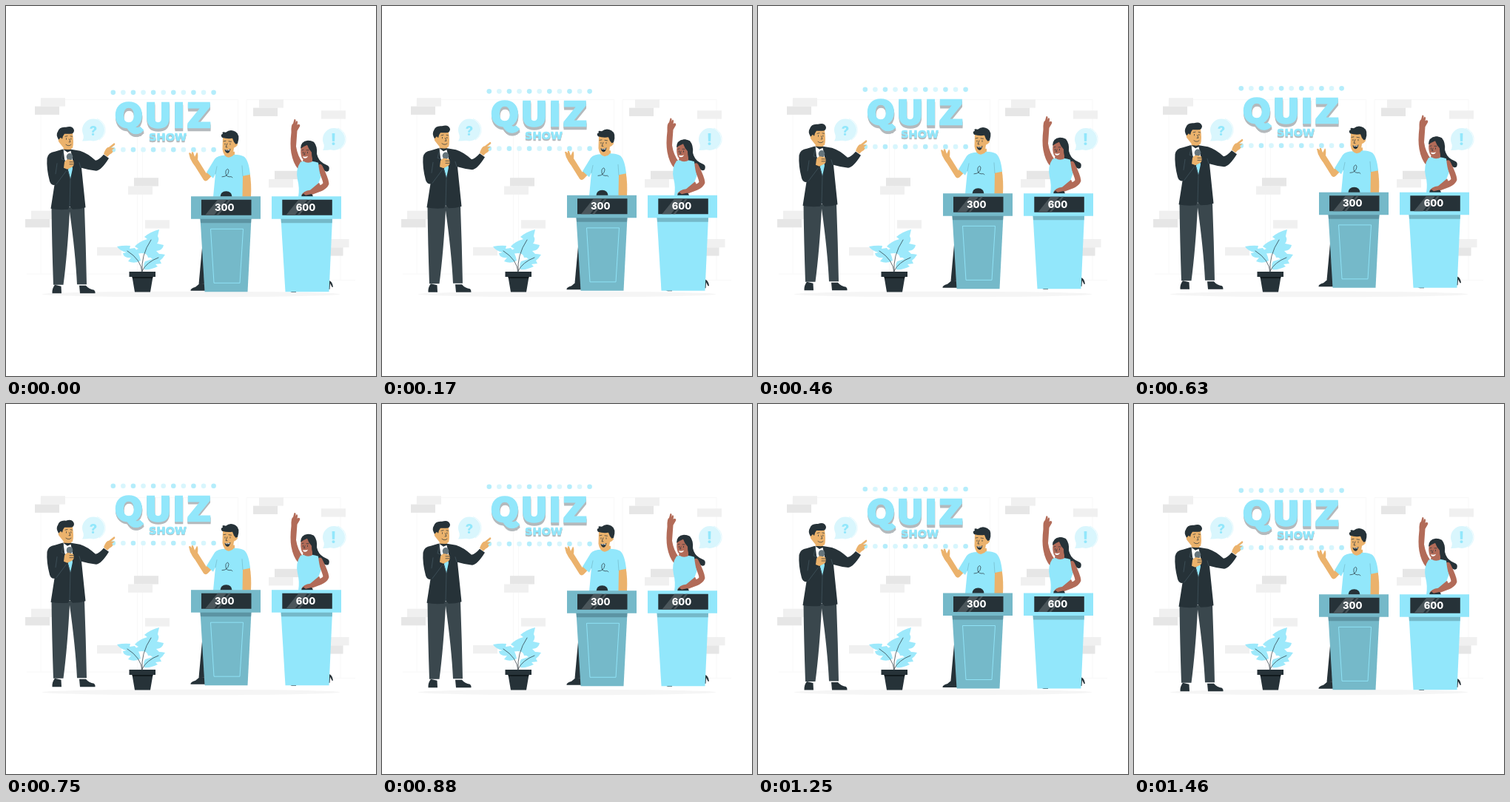
An HTML page that plays this animation: 500x500 px, repeating every 1500 ms.

```html
<!DOCTYPE html>
<html lang="en">
<head>
<meta charset="utf-8">
<title>Quiz show</title>
<style>
  html, body { margin: 0; width: 100%; height: 100%; overflow: hidden; background: #fff; }
  svg { display: block; width: 100%; height: 100%; }
  text { font-family: Inter, sans-serif; font-weight: 800; text-anchor: middle; }
  .cyan { fill: #92e7fb; }
  .teal { fill: #75b9c9; }
  .dark { fill: #263238; }
  .slate { fill: #3a474d; }
  .tan { fill: #ebb26c; }
  .brown { fill: #b26b58; }
  .white { fill: #fff; }
  .line { fill: none; stroke: #263238; stroke-width: .7; stroke-linecap: round; stroke-linejoin: round; }
  .limb { fill: none; stroke-linecap: round; stroke-linejoin: round; }
  .face { fill: none; stroke: #263238; stroke-width: .7; stroke-linecap: round; }
  .quiz, .show { font-family: "DejaVu Sans", sans-serif; font-weight: 700; }
  .quiz { font-size: 45px; stroke-width: 2.4; }
  .show { font-size: 14.5px; stroke-width: .6; }
</style>
</head>
<body>
<svg viewBox="0 0 500 500">
  <defs>
    <g id="quiz">
      <text class="quiz" x="166 205.500 233.500 260.700" y="164">QUIZ</text>
      <path d="M163 163L172 161Q175 167 181 163.500L186 168Q180 174.500 172 172.500Q166 170.500 163 163Z"/>
    </g>
    <text id="show" class="show" x="218.500" y="182">SHOW</text>
    <g id="bubble">
      <circle r="15" fill="#d9f6fd"/>
      <path d="M-14 3Q-12 11-15 15Q-8 15-3 14Z" fill="#d9f6fd"/>
      <path d="M5-15A15.500 15.500 0 0 1 8 13.500" fill="none" stroke="#d9f6fd" stroke-width=".8"/>
    </g>
    <g id="screen">
      <path class="dark" d="M264 262H331.500V283H264Z"/>
      <path d="M269 283L286 262H298L281 283ZM284 283L301 262H304L287 283Z" fill="#4b565b"/>
    </g>
  </defs>

  <path d="M47 362V126.500H313.500V250M325 250V126.500H452V370M177.500 165V360M184.500 190V360M28 362H165M440 370.500H472" fill="none" stroke="#f8f8f8"/>
  <g id="bricks"></g>
  <ellipse cx="250" cy="389.500" rx="201" ry="3.800" fill="#f5f5f5"/>

  <use href="#bubble" x="118" y="167.500"/>
  <text class="cyan" x="118" y="174.500" font-size="18">?</text>
  <use href="#bubble" x="443" y="180"/>
  <text class="cyan" x="442.500" y="187.500" font-size="21">!</text>

  <g id="plant">
    <path d="M207 302Q195 305 187 312L191 315Q180 318 174 325L179 328Q172 331 174 335L184 334Q191 334 192 340Q202 340 207 335L203 331Q212 330 213 323L204 321Q208 316 205 311Z" fill="#9de9fb"/>
    <path d="M150 325Q160 323 168 324L167 328L174 327Q180 333 182 344Q174 349 165 345L169 340Q159 341 158 334L163 333Q154 331 150 325Z" fill="#9de9fb"/>
    <path d="M215 336Q202 333 194 339L198 342L188 345Q185 350 187 356Q195 357 205 352L202 349L210 348L208 344Q212 341 215 336Z" fill="#9de9fb"/>
    <path class="line" d="M184 360Q182 337 196 316M184 360Q183 343 164 331M184 358Q190 346 206 340"/>
    <path class="dark" d="M166.500 359H202V366H198.500L195 386.500H174L170.500 366H166.500Z"/>
    <path d="M170.500 366H198.500L198 368H171Z" fill="#11191d"/>
  </g>

  <g id="floating">
    <g id="dots"></g>
    <g fill="#b4b9bc" stroke="#b4b9bc">
      <use href="#quiz" x=".3" y="3.800"/>
      <use href="#quiz" x=".2" y="1.900"/>
      <use href="#show" y="1.800"/>
    </g>
    <g fill="#92e7fb" stroke="#92e7fb">
      <use href="#quiz"/>
      <use href="#show"/>
    </g>

    <g id="host">
      <path class="dark" d="M66 377L74.500 379L75 388.500H62.500Q62 382 66 377ZM99 378L108 378Q112 383 119 384Q121 386 120.500 388.500H100Z"/>
      <path class="slate" d="M61.500 272H106Q108 325 109 376.500H96Q94 335 86 278Q83 335 77.500 377H64Q62 320 61.500 272Z"/>
      <path class="tan" d="M78 187H88V203H77Z"/>
      <path class="dark" d="M76 194L66 197Q57 198 55.500 206Q54.500 220 59 237Q61 243 65.500 242L60.500 274Q70 276 84 275L86 271L90 275Q100 275 107.500 272.500L102 219Q112 222 122 223Q129 222 139 206L132 201Q126 208 121 209Q110 199 100 196L88 194Z"/>
      <path class="white" d="M77.500 194L83 198L87.500 196L90 207L89 220L87 230L79 207Z"/>
      <path class="cyan" d="M84 203L87 202L90 220L87 234L84 221Z"/>
      <path class="line" d="M67 227L69 213M68 241L83 221M78 195L75 207L79 208L87 234L86 271M101 219L99 212" style="stroke:#455a64"/>
      <path class="tan" d="M132 200Q135 191 139 191L146 185.500Q148 186 147 188L142 192L147 192L143 195Q147 197 140 201L137 204Z"/>
      <path class="tan" d="M72 174Q78 166 90 172Q92 186 90 192Q83 197 77 191L73 186Q69 182 72 179Z"/>
      <path class="dark" d="M71 181Q67 174 70 170Q72 163 81 164Q90 161 92 168Q92 173 87 173H79Q77 175 76 180L74 178Z"/>
      <path class="face" d="M80 176.500L83 175.800M87 176L89.500 176.500M81.500 179V180.500M87.800 179V180.500M85.500 180L87 184H85M81 187.500Q85 190.500 88 187.500"/>
      <path class="limb" d="M85.500 204L82 221" stroke="#263238" stroke-width="4"/>
      <ellipse cx="86" cy="204" rx="4.300" ry="4.800" fill="#66757c"/>
      <path class="tan" d="M79 211Q82 206 87 208L91 209Q93 216 89 218L83 221L78 219Z"/>
      <path class="face" d="M86 211H91M86 214H91"/>
    </g>

    <g id="leftPlayer">
      <path class="dark" d="M266 316H275V376H260.500Z"/>
      <path class="dark" d="M262 375L269 376V385H249.500Q249 382 256 380Z"/>
      <path class="limb" d="M280 222L270 232.500L256.500 211" stroke="#ebb26c" stroke-width="7.800"/>
      <path class="tan" d="M252 212Q248 206 247 199Q249 197 251 201Q250 196 253 198L255 204L258 198Q260 199 259 208L261 213L255 216Z"/>
      <path class="tan" d="M318 227L329.500 226Q332 241 331 258H319Z"/>
      <path class="tan" d="M297 197H309V208H297Z"/>
      <path class="cyan" d="M297 202Q286 202 282 207L271 225L280 233L283 227L280 258H319.500L320 230L330 228Q328 209 322 204Q317 201 308 201Q304 207 297 202Z"/>
      <path class="line" d="M283 227L285 217M320 230L319 216" style="stroke:#75b9c9"/>
      <path class="line" d="M292 231Q300 231 301 223Q300 218 297 223Q296 231 302 231Q305 230 306 232"/>
      <path class="tan" d="M293 177Q302 173 311 178L313 188Q311 191 308 192Q307 204 301 205Q294 204 292.500 194Z"/>
      <path class="dark" d="M292 178Q289 174 293 173Q291 169 297 171Q303 166 310 170Q317 174 313 186L310.500 187L308 184L306 179Q299 180 292 178Z"/>
      <path class="face" d="M294 183L297 182.500M301 183L304.500 183.500M296 186V187.500M303 186V187.500M299 186L297 191H299"/>
      <path class="dark" d="M295.500 194Q300 195.500 303.500 193Q302.500 199 299 199Q296 198 295.500 194Z"/>
      <path class="white" d="M296.500 194.300Q300 195.500 302.500 194L302 195.500H297Z"/>
    </g>

    <g id="rightPlayer">
      <path class="dark" d="M436 371Q441 372 442 380L440.500 380L438 375L437.500 383H436ZM382 385H392V387H386Z"/>
      <path class="dark" d="M400 188Q407 179 416 184Q421 190 420 200Q422 209 429 213L435 216Q438 218 436 223Q431 226 428 219Q420 222 412 212Z"/>
      <path class="brown" d="M385.500 171Q383.500 188 385.500 199Q388 213 395 221L401 212Q394 203 392 190L393.500 169L397 163Q398 160 395 160L393.500 161Q395 155 392.500 155.500L391.500 158Q392 152 389.500 153.500L388 159Q385 160 385.500 171Z"/>
      <path class="brown" d="M402 203H414V218H400Z"/>
      <path class="limb" d="M424 218Q432 234 432.500 240Q431 244 424 247L408 253" stroke="#b26b58" stroke-width="7.800"/>
      <path class="brown" d="M399 254Q402 250 411 249L413 256L402 257Z"/>
      <path class="cyan" d="M398 211L402 210Q408 214 415 210L422 212Q423 223 425.500 231L421 243L424 247L408 253L403 258H395Q397 246 394 235Q391 221 398 211Z"/>
      <path class="brown" d="M423 239L427 247L409 256L399 256Q402 250 411 249Z"/>
      <path class="brown" d="M399 191Q405 184 414 190Q416 201 412 207Q405 211 400 206Q397 198 399 191Z"/>
      <path class="dark" d="M398 193Q398 183 408 182Q418 182 419 196Q421 206 416 211Q413 206 413 198Q409 194 407 188Q402 190 398 193Z"/>
      <path class="face" d="M400 195L402 194.500M406 195L409 195M401.500 197.500V199M407.500 197.500V199M404 198L402.500 201H404"/>
      <path class="white" d="M401 203.500Q405 204.500 408 203Q407 206 404 206Q401.500 206 401 203.500Z"/>
    </g>

    <g id="leftPodium">
      <path class="dark" d="M289.500 258Q290 250.500 297.500 250.500Q305 250.500 305.500 258Z"/>
      <path class="teal" d="M262.500 287H331.500L326.500 386.500H268.500Z"/>
      <path d="M262.500 287H331.500L331 293.500H263Z" fill="#5c94a3"/>
      <path class="teal" d="M250 257.500H344V288H250Z"/>
      <path d="M276.500 301.500H320.500L316 374.500H281Z" fill="none" stroke="#92e7fb" stroke-width=".9"/>
      <use href="#screen"/>
      <text class="white" x="295.300" y="277" font-size="13">300</text>
    </g>

    <g id="rightPodium">
      <path class="dark" d="M399 258Q400 252.500 407 252.500Q414 252.500 415 258Z"/>
      <path class="brown" d="M402 254Q407 249 415 250L414 254L405 256Z"/>
      <path class="cyan" d="M371.500 287H441L436.500 386.500H377.500Z"/>
      <path class="teal" d="M371.500 287H441L440.700 293.500H372Z"/>
      <path class="cyan" d="M359 257.500H453V288H359Z"/>
      <use href="#screen" x="109.300"/>
      <text class="white" x="405" y="277" font-size="13">600</text>
    </g>
  </g>
</svg>
<script>
  const PERIOD = 1500, LIFT = 6.5, PHASE = 20;
  const byId = id => document.getElementById(id);

  function add(parent, tag, attrs) {
    const el = document.createElementNS(parent.namespaceURI, tag);
    for (const key in attrs) el.setAttribute(key, attrs[key]);
    parent.append(el);
  }

  const LIGHT = '#f0f0f0', SHADE = '#e6e6e6';
  function brick(x, y, fill) {
    add(byId('bricks'), 'rect', { x, y, width: 33, height: 11.3, fill });
  }
  function brickPair(x, y, upper, lower) {
    brick(x, y, upper);
    brick(x - 8, y + 11.3, lower);
  }
  brickPair(47, 124.3, LIGHT, SHADE);
  brickPair(342, 126.3, LIGHT, SHADE);
  brickPair(173, 232.2, SHADE, LIGHT);
  brickPair(363, 222.8, SHADE, LIGHT);
  brickPair(34, 276.7, LIGHT, SHADE);
  brickPair(430.5, 315, LIGHT, SHADE);
  for (const [x, y] of [[426, 141.3], [188, 289.3], [123, 326]]) brick(x, y, LIGHT);

  for (const cy of [117, 194.3])
    for (let i = 0; i < 11; i++)
      add(byId('dots'), 'circle', {
        cx: 144.8 + i * 13.58, cy, r: 3.3, fill: i % 2 ? '#d8f6fd' : '#b4edfb'
      });

  const floating = byId('floating');
  function draw(now) {
    const phase = (now + PHASE) / PERIOD % 1;
    const rise = 1 - Math.abs(2 * phase - 1);
    floating.setAttribute('transform', `translate(0 ${-LIFT * rise})`);
    requestAnimationFrame(draw);
  }
  draw(performance.now());
</script>
</body>
</html>
```
